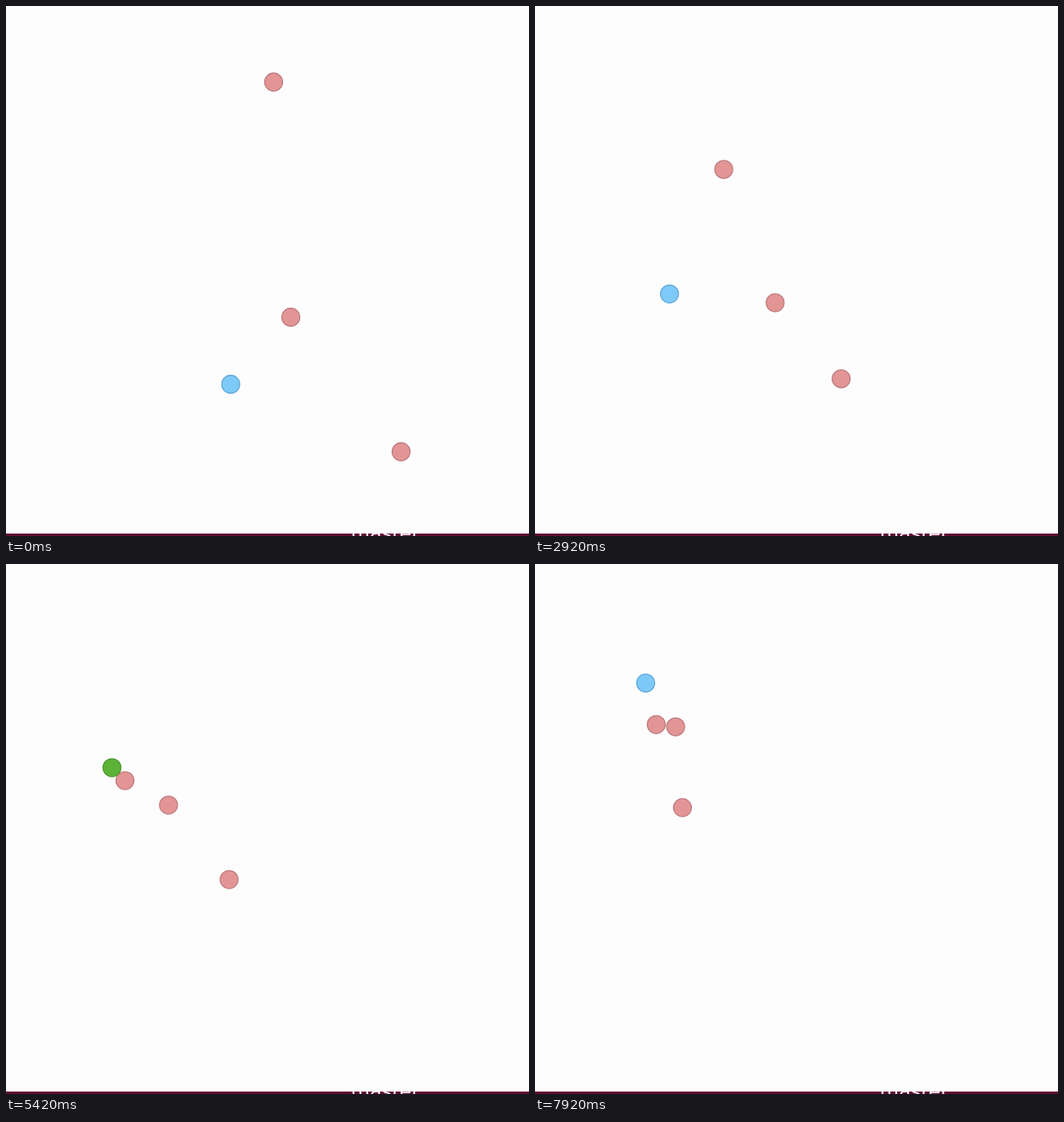
An HTML page for the animation above (8 s loop, 640 by 648 pixels).

```html
<!DOCTYPE html>
<html lang="en">
<head>
<meta charset="utf-8">
<title>Chasing dots</title>
<style>
  html, body { margin: 0; width: 100%; height: 100%; overflow: hidden; background: #fdfdfd; }
  svg { display: block; }
  circle { stroke-width: 1.3; }
  .chaser { fill: #e39595; stroke: #bf7d80; }
  .runner { fill: #7dcaf9; stroke: #62a9d9; }
  .runner.hit { fill: #5cb236; stroke: #4d9a30; }
  text { font: 23.8px "DejaVu Sans", sans-serif; fill: #fdfdfd; }
</style>
</head>
<body>
<svg width="640" height="648" viewBox="0 0 640 648">
  <rect y="645" width="640" height="3" fill="#600c34"/>
  <text x="422" y="653">master</text>
  <circle class="chaser" r="11"/>
  <circle class="chaser" r="11"/>
  <circle class="chaser" r="11"/>
  <circle class="runner" r="11"/>
</svg>
<script>
const LOOP = 8000, FPS = 12, TOUCH = 23;
const SPEED = 3.45;                  // runner's pixels per tick
const PAUSE_AT = 14, PAUSE_LEN = 3;  // ticks

// A few key points per dot: runner's travel, x, y
const chasers = [
  [[0, 327.5, 93], [150, 197, 234], [215, 145, 265], [254, 143, 248], [319, 148.5, 195]],
  [[0, 348.5, 380.5], [48, 342.5, 392], [150, 258.5, 339], [215, 198, 294], [254, 176, 259.5], [319, 172, 197.5]],
  [[0, 483.5, 545], [48, 436.5, 501], [150, 335.5, 428.5], [215, 272, 385], [319, 179, 296.5]]
];
const runner = [[0, 275, 462.5], [161, 114, 301.5], [215, 130, 248], [319, 135.5, 144]];

const dots = [...document.querySelectorAll('circle')];
const slope = (a, b, k) => (b[k] - a[k]) / (b[0] - a[0]);

// Point on a path at travel d; smooth paths use cubic Hermite curves
function along(path, d, smooth) {
  const next = path.findIndex((p, i) => i && p[0] >= d);
  const a = path[next - 1], b = path[next];
  const before = path[next - 2] || a, after = path[next + 1] || b;
  const h = b[0] - a[0], f = (d - a[0]) / h;
  return [1, 2].map(k => {
    const s = slope(a, b, k), line = a[k] + s * h * f;
    if (!smooth) return line;
    const into = slope(before, b, k) - s, out = slope(a, after, k) - s;
    return line + h * f * (1 - f) * (into * (1 - f) - out * f);
  });
}

function draw(now) {
  // the small offset absorbs times rounded to 10 ms
  const tick = Math.floor((now % LOOP) * FPS / 1000 + 0.05);
  const paused = Math.min(PAUSE_LEN, Math.max(0, tick - PAUSE_AT));
  const d = (tick - paused) * SPEED % (LOOP * FPS / 1000 * SPEED);
  const spots = chasers.map(path => along(path, Math.min(d, 319), true));
  const [rx, ry] = along(runner, Math.min(d, 319), false);
  const hit = spots.some(([x, y]) => Math.hypot(x - rx, y - ry) < TOUCH);
  [...spots, [rx, ry]].forEach(([x, y], i) => {
    dots[i].setAttribute('cx', x);
    dots[i].setAttribute('cy', y);
  });
  dots[3].classList.toggle('hit', hit);
}

const start = performance.now();
function loop() {
  draw(performance.now() - start);
  requestAnimationFrame(loop);
}
loop();
</script>
</body>
</html>
```
